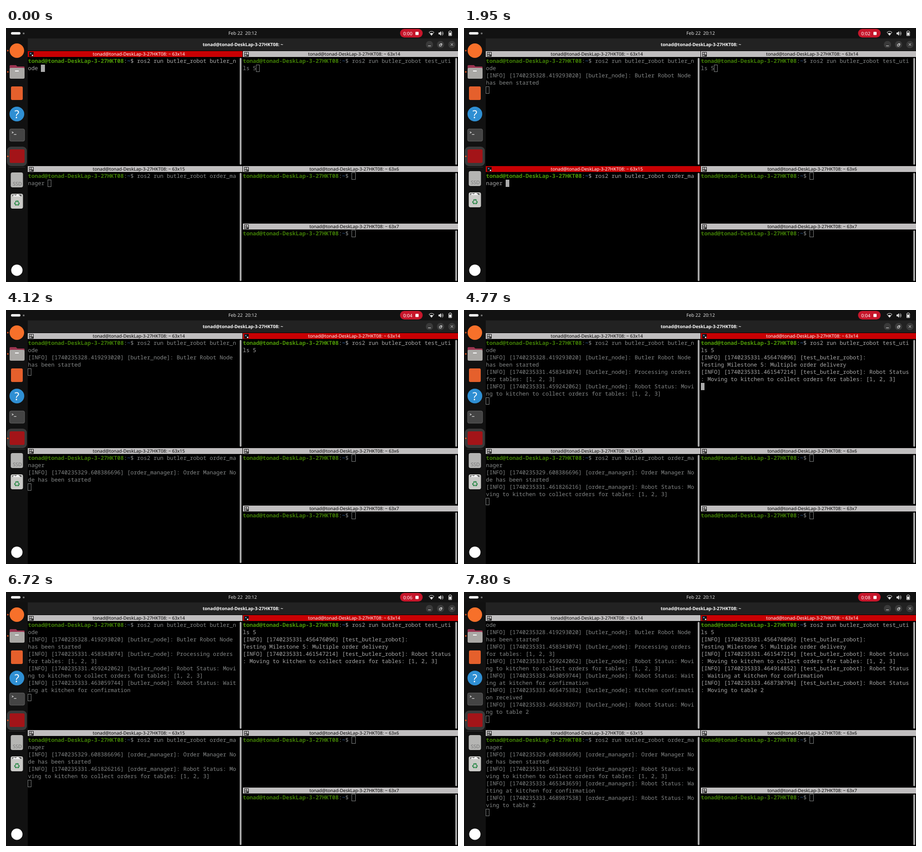
These frames come from a looping animation (998x561 px, 8 s). An HTML page:

```html
<!DOCTYPE html>
<html lang="en">
<head>
<meta charset="utf-8">
<title>Terminal session</title>
<style>
html, body { margin: 0; width: 100%; height: 100%; overflow: hidden; background: #000; }
body { position: relative; text-rendering: geometricPrecision; font: 10px "Noto Sans", sans-serif; }
svg { position: absolute; left: 0; top: 0; }
.pane { position: absolute; overflow: hidden; --fg: #858888; --green: #3f7d05; --blue: #2a5183; }
.pane.focus { --fg: #aaa; --green: #4e9a06; --blue: #3465a4; }
.bar { position: absolute; left: 0; right: 0; top: 0; height: 13px; line-height: 13px;
  background: #c0bebf; color: #000; text-align: center; text-indent: 17px; white-space: pre; }
.focus .bar { background: #c80003; color: #fff; }
.icon { position: absolute; left: 3px; top: 2px; width: 8px; height: 8px; border: 1px solid #111;
  background: linear-gradient(#111, #111) 3px 0 / 1px 8px no-repeat, linear-gradient(#111, #111) 0 4px / 8px 1px no-repeat,
    linear-gradient(#111, #111) 5px 6px / 3px 2px no-repeat; }
.focus .icon { background: linear-gradient(#4a7fb5, #4a7fb5) 1px 1px / 3px 3px no-repeat,
  linear-gradient(#ddd, #ddd) 5px 5px / 3px 3px no-repeat, #111; }
.scroll { position: absolute; right: 2px; top: 15px; bottom: 2px; width: 4px; border-radius: 2px; background: #a6a6a6; }
pre { position: absolute; left: .6px; top: 14px; margin: 0; color: var(--fg);
  font: 12.17px/16px "Noto Sans Mono", monospace; }
.name, .path { font-weight: 700; color: var(--green); }
.path { color: var(--blue); }
.cursor { position: absolute; width: 8.3px; height: 16px; box-sizing: border-box; border: 1px solid var(--fg); }
.focus .cursor { background: var(--fg); }
</style>
</head>
<body>
<svg width="998" height="561" viewBox="0 0 998 561">
  <rect width="998" height="561" fill="#000"/>
  <rect width="998" height="23" fill="#121212"/>
  <rect y="23" width="48" height="538" fill="#111"/>
  <rect x="48" y="23" width="950" height="27" fill="#222"/>

  <rect x="11" y="9" width="21" height="5.5" rx="2.7" fill="#f4f4f4"/>
  <circle cx="39" cy="12" r="2" fill="#777"/>
  <text x="522.5" y="15" font-size="10.2" fill="#ddd" text-anchor="middle" xml:space="preserve">Feb 22&#160; 20:12</text>
  <rect x="870" y="2" width="50" height="19" rx="9.5" fill="#c7162b"/>
  <text id="clock" x="877" y="15.5" font-size="10.2" fill="#fff">0:00</text>
  <rect x="904" y="8.5" width="7" height="7" rx="1" fill="#fff"/>
  <path d="M934 9.5Q939.5 5 945 9.5L939.5 16.5Z" fill="none" stroke="#eee"/>
  <path d="M936.5 12Q939.5 10 942.5 12L939.5 16Z" fill="#eee"/>
  <path d="M955 10h2.5l3-3v10l-3-3H955Z" fill="#eee"/>
  <path d="M962 9.5q2 2.5 0 5M963.5 7.5q3.500 4.500 0 9" fill="none" stroke="#eee"/>
  <path d="M979 6.500h3.500v1.500h1.500v9h-6.500v-9h1.500Z" fill="none" stroke="#eee"/>
  <rect x="978.5" y="10" width="4.500" height="6" fill="#eee"/>

  <text id="title" x="523" y="40" font-size="9.9" font-weight="700" fill="#fff" text-anchor="middle"></text>
  <g fill="#3a3a3a">
    <circle cx="935" cy="36.500" r="8"/><circle cx="959.5" cy="36.500" r="8"/><circle cx="984.5" cy="36.500" r="8"/>
  </g>
  <path d="M932 39.500h6M957 36h4v4h-4ZM959 34.500h3.500v3.500M982 34l5 5M987 34l-5 5" fill="none" stroke="#eee"/>

  <circle cx="24" cy="50" r="16" fill="#f7702a"/>
  <path d="M10 82h12l3 3h14q2 0 2 2v8H8V84q0-2 2-2Z" fill="#9b3450"/>
  <rect x="8" y="88" width="33" height="24" rx="3" fill="#aaa8a5"/>
  <rect x="20" y="94" width="8" height="2" fill="#fff"/>
  <rect x="11" y="129" width="26" height="30" rx="3" fill="#e5602c"/>
  <circle cx="24" cy="190" r="16.300" fill="#2f8fd3"/>
  <text x="24" y="198.500" font-size="24" fill="#fff" text-anchor="middle">?</text>
  <rect x="8" y="223" width="33" height="27" rx="3" fill="#444" stroke="#626262"/>
  <text x="12" y="234" font-size="9" font-weight="700" fill="#fff" font-family="Noto Sans Mono, monospace">&gt;_</text>
  <rect x="2" y="262" width="44" height="43" rx="9" fill="#3a3a3a"/>
  <rect x="8" y="268" width="33" height="30" rx="3" fill="#a31418"/>
  <path d="M6 307.500h36" stroke="#333"/>
  <g fill="#e95420"><circle cx="4" cy="50" r="1.700"/><circle cx="4" cy="97" r="1.700"/><circle cx="4" cy="283.500" r="1.700"/></g>
  <g id="drives">
    <rect x="10.500" y="316" width="27" height="33" rx="4" fill="#b5b5b3"/>
    <text x="25" y="344.500" font-size="11" fill="#777" text-anchor="middle">SSD</text>
    <rect x="10.500" y="363" width="27" height="33" rx="4" fill="#cbcbc8"/>
    <rect x="14" y="365" width="20" height="4" rx="1" fill="#555"/>
    <path d="M15 369l2-4 4 2 5-3 7 5Z" fill="#f5f5f5"/>
    <text x="24" y="390" font-size="17" fill="#2f8a4b" text-anchor="middle" font-family="DejaVu Sans, sans-serif">&#x267B;&#xFE0E;</text>
  </g>
  <circle cx="24" cy="535" r="12.500" fill="#fff"/>
</svg>

<script>
const LOOP = 8000, COLS = 63, CELL = 7.3, ROW = 16;
const NAME = "tonad@tonad-DeskLap-3-27HKT08", PROMPT = NAME + ":~$ ";
const RUN = PROMPT + "ros2 run butler_robot ";
const TOUR = "Robot Status: Moving to kitchen to collect orders for tables: [1, 2, 3]\n";
const WAIT = "Robot Status: Waiting at kitchen for confirmation\n";
const TABLE = "Robot Status: Moving to table 2\n";

const logger = node => (stamp, text) => `[INFO] [1740235${stamp}] [${node}]: ${text}`;
const butler = logger("butler_node"), order = logger("order_manager"), test = logger("test_butler_robot");

// Each output entry: [time in ms, text]
const panes = [
  { x: 48, y: 51, w: 473.5, h: 253, rows: 14, size: "63x14", out: [
    [0, RUN + "butler_node "], [860, "\n"],
    [1520, butler("328.419293020", "Butler Robot Node has been started\n")],
    [4770, butler("331.458343074", "Processing orders for tables: [1, 2, 3]\n") + butler("331.459242062", TOUR)],
    [6720, butler("333.463059744", WAIT)],
    [6930, butler("333.465475382", "Kitchen confirmation received\n") + butler("333.466338267", TABLE)]] },
  { x: 48, y: 305, w: 473.5, h: 256, rows: 15, size: "63x15", out: [
    [0, RUN + "order_manager "], [2170, "\n"],
    [2820, order("329.608386696", "Order Manager Node has been started\n")],
    [4770, order("331.461826216", TOUR)],
    [6930, order("333.465343659", WAIT) + order("333.468987538", TABLE)]] },
  { x: 522.5, y: 51, w: 475.5, h: 253, rows: 14, size: "63x14", out: [
    [0, RUN + "test_utils 5"], [4550, "\n"],
    [4770, test("331.456476096", "\nTesting Milestone 5: Multiple order delivery\n") + test("331.461547214", TOUR)],
    [6930, test("333.464914852", WAIT) + test("333.468730794", TABLE)]] },
  { x: 522.5, y: 305, w: 475.5, h: 126, rows: 6, size: "63x6", out: [[0, PROMPT]] },
  { x: 522.5, y: 432, w: 475.5, h: 129, rows: 7, size: "63x7", out: [[0, PROMPT]] }
];
const focusTimes = [1730, 3030];
const secondTimes = [860, 1950, 2820, 3900, 4980, 5850, 6930, 7800];
const dockTimes = [220, 430, 650];
const cursorOn = [[0, 430], [860, 1520], [1730, 2820], [3470, 4120], [4550, 5200], [5630, 6500], [7150, 7580]];

const byId = id => document.getElementById(id);
const passed = (times, t) => times.filter(time => time <= t).length;

byId("title").textContent = NAME + ": ~";
for (const p of panes) {
  p.el = document.createElement("div");
  p.el.style.cssText = `left:${p.x}px;top:${p.y}px;width:${p.w}px;height:${p.h}px`;
  p.el.innerHTML = `<div class="bar">${NAME}: ~ ${p.size}<i class="icon"></i></div><div class="scroll"></div><pre></pre>`;
  p.pre = p.el.querySelector("pre");
  document.body.append(p.el);
}

function wrap(text) {
  return text.split("\n").flatMap(line => {
    const rows = [];
    do { rows.push(line.slice(0, COLS)); line = line.slice(COLS); } while (line);
    return rows;
  });
}

function drawPane(p, t, focused, blink) {
  const rows = wrap(p.out.filter(([time]) => time <= t).map(([, text]) => text).join("")).slice(-p.rows);
  const col = rows[rows.length - 1].length;
  let html = rows.join("\n").replace(PROMPT, `<span class="name">${NAME}</span>:<span class="path">~</span>$ `);
  if (!focused || blink)
    html += `<i class="cursor" style="left:${col * CELL - .5}px;top:${(rows.length - 1) * ROW}px"></i>`;
  p.el.className = focused ? "pane focus" : "pane";
  if (html !== p.html) p.pre.innerHTML = p.html = html;
}

function draw(t) {
  const focus = passed(focusTimes, t);
  const blink = cursorOn.some(([from, to]) => t >= from && t < to);
  panes.forEach((p, i) => drawPane(p, t, i === focus, blink));
  byId("clock").textContent = "0:0" + passed(secondTimes, t);
  byId("drives").setAttribute("transform", `translate(0 ${3 - passed(dockTimes, t)})`);
}

const start = performance.now();
function tick() {
  draw((performance.now() - start) % LOOP);
  requestAnimationFrame(tick);
}
tick();
</script>
</body>
</html>
```
